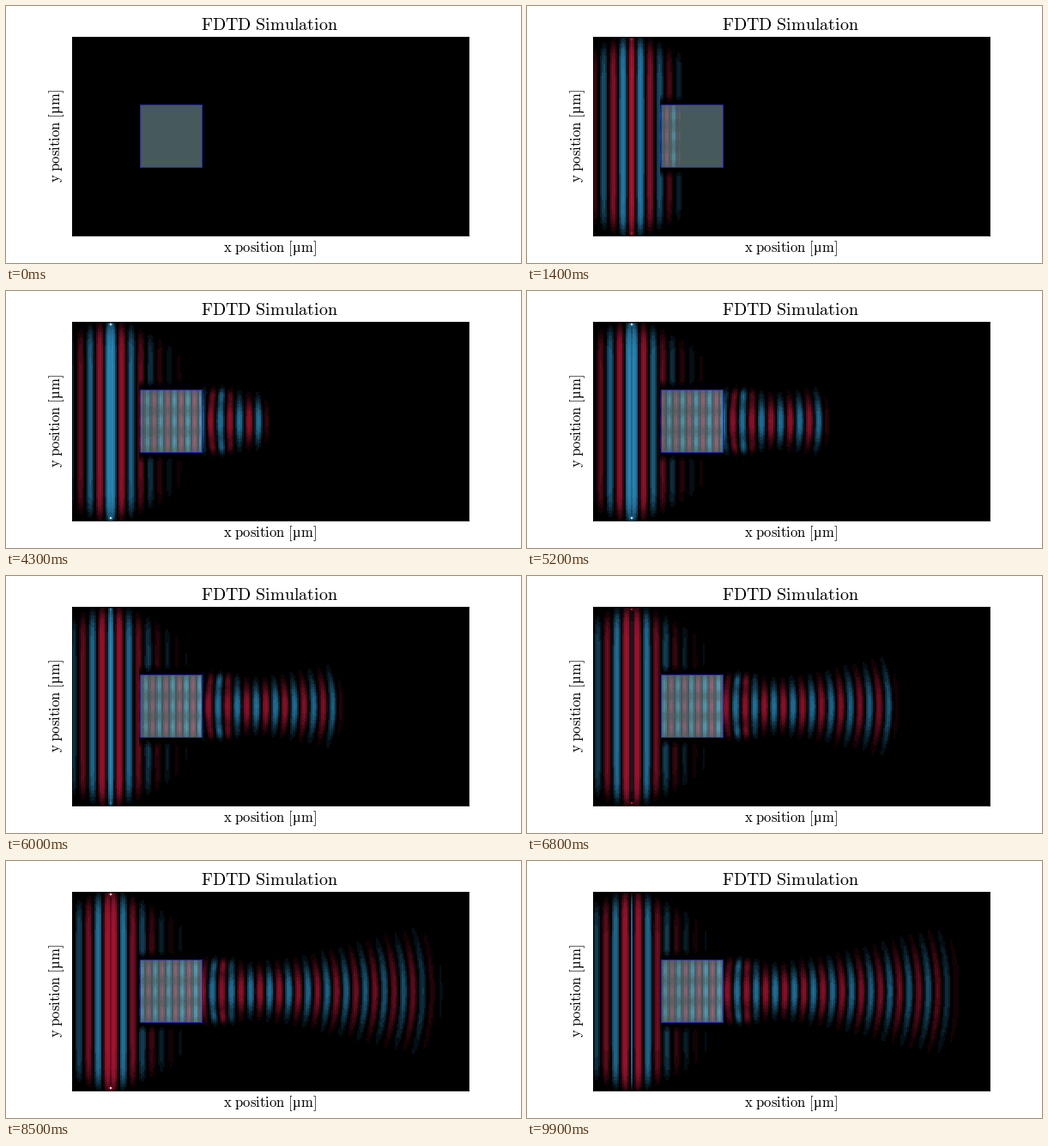
A matplotlib script for the animation above (10000 ms loop, 600x300 px).

```python
import numpy as np
import matplotlib.pyplot as plt
from matplotlib.animation import FuncAnimation
from matplotlib.colors import LinearSegmentedColormap
from matplotlib.patches import Rectangle

W, H, FRAMES = 600, 300, 100
LEFT, TOP, PW, PH = 77, 36, 462, 232    # plot area in pixels
SRC, FRONT, BACK, HALF = 122, 156, 228, 36.5
OMEGA = 1.433                           # radians per frame
K, K_BLOCK = 2 * np.pi / 22.3, 0.4      # radians per pixel
PHASE = 1.39
WAIST_X, WAIST, RAYLEIGH = 275, 25, 88  # focus behind the block

plt.rcParams["mathtext.fontset"] = "cm"
plt.rcParams["font.family"] = "Liberation Serif"

xs = LEFT + np.arange(0, PW, 2) + 1
ys = np.arange(0, PH, 2) + 1 - PH / 2
x, y = np.meshgrid(xs, ys)
r = np.abs(y)
dist = np.abs(x - SRC)


def bump(v, centre, width):
    return np.exp(-((v - centre) / width) ** 2)


# Wave radiated by the line source, shadowed by the block.
side_path = K * dist
side_amp = 0.55 * np.exp(-dist / 40) * np.exp(-(r / (115 - 0.3 * dist).clip(20)) ** 10)
side_amp *= np.where(x < FRONT, 1, np.clip((r - HALF) / 12, 0, 1))

# Wave inside the block, then the focused beam behind it.
z = x - WAIST_X
width = WAIST * np.sqrt(1 + (z / RAYLEIGH) ** 2)
bend = np.where(x > BACK, K * r ** 2 * z / (2 * (z ** 2 + RAYLEIGH ** 2)), 0)
core_path = K * dist + (K_BLOCK - K) * np.clip(x - FRONT, 0, BACK - FRONT) + bend

depth = (x - FRONT) / (BACK - FRONT)
block_amp = (0.25 + 0.1 * depth) * (0.8 + 0.2 * np.cos(2 * np.pi * y / 24))
block_amp *= r < HALF
beam_amp = 0.38 * np.sqrt(WAIST / width) * bump(r, 0, width)
beam_amp += 0.2 * bump(x, 250, 16) * bump(r, 30, 8)
beam_amp *= np.clip((520 - x) / 45, 0, 1)
core_amp = np.where(x < FRONT, 0, np.where(x < BACK, block_amp, beam_amp))

tips = 0.9 * bump(x, SRC, 1.5) * bump(r, 113, 1.5)


def wave(t, amp, path):
    """Harmonic wave that switches on when its front arrives."""
    on = np.clip((t - path / OMEGA) / 3, 0, 1)
    return amp * on * np.cos(OMEGA * t - PHASE - path)


def field(t):
    return (wave(t, side_amp, side_path) + wave(t, core_amp, core_path)
            + min(t, 1) * tips * np.cos(OMEGA * t - 2.4))


def rgb(*c):
    return tuple(v / 255 for v in c)


black = (0.04, (0, 0, 0))
cold = [black, (0.3, rgb(30, 95, 130)), (0.5, rgb(40, 130, 175)),
        (0.7, rgb(60, 150, 195)), (1.0, rgb(215, 235, 245))]
hot = [black, (0.3, rgb(118, 16, 38)), (0.5, rgb(160, 20, 46)),
       (0.7, rgb(190, 30, 55)), (1.0, rgb(245, 225, 225))]
stops = ([(0.5 - v / 2, c) for v, c in reversed(cold)]
         + [(0.5 + v / 2, c) for v, c in hot])
cmap = LinearSegmentedColormap.from_list("coldhot", stops, N=51)

fig = plt.figure(figsize=(W / 100, H / 100), dpi=100, facecolor="white")
ax = fig.add_axes([LEFT / W, 1 - (TOP + PH) / H, PW / W, PH / H],
                  facecolor="black")
image = ax.imshow(field(0), cmap=cmap, vmin=-1, vmax=1, aspect="auto",
                  interpolation="nearest",
                  extent=(LEFT, LEFT + PW, TOP + PH, TOP))
ax.set_xticks([])
ax.set_yticks([])
for spine in ax.spines.values():
    spine.set_linewidth(0.6)
box = (FRONT, 115), BACK - FRONT, 73
ax.add_patch(Rectangle(*box, facecolor="powderblue", alpha=0.4, lw=0))
ax.add_patch(Rectangle(*box, fill=False, edgecolor="#2626a8", lw=0.8))


def label(px, py, text, size, angle=0):
    fig.text(px / W, 1 - py / H, text, size=size, rotation=angle, ha="center",
             va="baseline", rotation_mode="anchor", color="black")


def axis_name(letter):
    return r"$\mathrm{%s\ position\ [}$µ$\mathrm{m]}$" % letter


label(307, 28, r"$\mathrm{FDTD\ Simulation}$", 14.4)
label(307, 287, axis_name("x"), 12)
label(63, 152, axis_name("y"), 12, 90)


def update(i):
    image.set_data(field(i))
    return [image]


anim = FuncAnimation(fig, update, frames=FRAMES, interval=100, repeat=True,
                     repeat_delay=0, blit=False)
plt.show()
```
